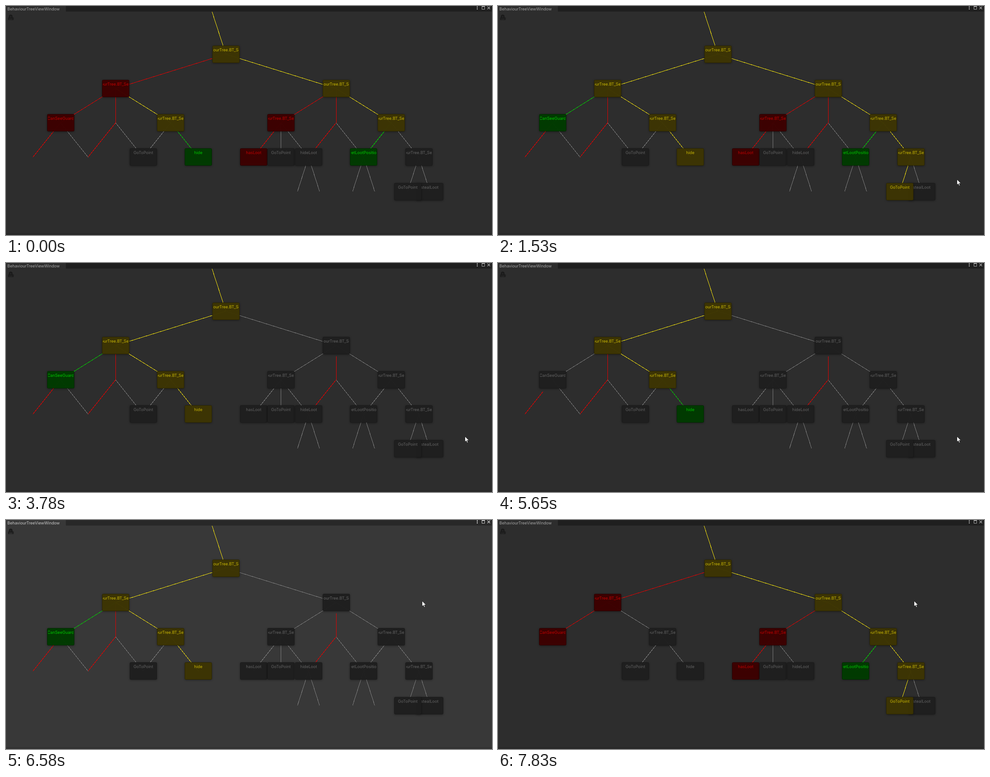
Write an HTML page that moves like this. It is 1088 px wide and 515 px high and loops after 8 s.

```html
<!DOCTYPE html>
<html lang="en">
<head>
<meta charset="utf-8">
<title>Behaviour tree view</title>
<style>
  html, body { margin: 0; width: 100%; height: 100%; overflow: hidden; background: #2d2d2d; }
  svg { display: block; width: 1088px; height: 515px; --bg: #2d2d2d; --bar: #1f1f1f; --ui: #a4a4a4; }
  svg.bright { --bg: #383838; --bar: #282828; --ui: #c8c8c8; }
  text { font: 9.1px Inter, "Liberation Sans", sans-serif; }
  line { stroke-width: 1; shape-rendering: crispEdges; }
  .node rect { stroke-width: 1; fill-opacity: .96; }
  .node { filter: drop-shadow(0 1px 2px rgba(0, 0, 0, .4)); }
  .node text { text-anchor: middle; }
  .node.x rect { fill: #202020; stroke: #1a1a1a; }
  .node.y rect { fill: #3e3604; stroke: #2d2700; }
  .node.r rect { fill: #3e0000; stroke: #2b0000; }
  .node.g rect { fill: #003c00; stroke: #002b00; }
  .node.x text { fill: #636363; }
  .node.y text { fill: #c8b606; }
  .node.r text { fill: #c00000; }
  .node.g text { fill: #00c600; }
  line.x { stroke: #7e7e7e; }
  line.y { stroke: #f7e40c; }
  line.r { stroke: #e60000; }
  line.g { stroke: #00d800; }
</style>
</head>
<body>
<svg id="stage" viewBox="0 0 1088 515">
  <rect width="1088" height="515" fill="var(--bg)"/>
  <rect y="511" width="1088" height="4" fill="#000" opacity=".12"/>
  <rect width="1088" height="12.5" fill="var(--bar)"/>
  <rect width="134" height="13" fill="var(--bg)"/>
  <text x="3" y="9.5" fill="var(--ui)">BehaviourTreeViewWindow</text>
  <g fill="var(--ui)">
    <rect x="1054" y="0" width="2" height="2"/>
    <rect x="1054" y="3" width="2" height="2"/>
    <rect x="1054" y="6" width="2" height="2"/>
  </g>
  <g fill="none" stroke="var(--ui)">
    <path d="M1065.5 1v6.5h6V1"/>
    <path d="M1065 1h7" stroke-width="2"/>
    <path d="M1077.8 1.2l6 6m0-6l-6 6" stroke-width="1.3"/>
  </g>
  <g id="lock">
    <rect x="4.500" y="25" width="13" height="7" rx="2" fill="#000" opacity=".22"/>
    <path d="M7.500 27v-3.500a3 3 0 0 1 6 0V27" fill="#222" stroke="#191919" stroke-width="2"/>
    <path d="M6 31.500V27h9.500v4.500" fill="none" stroke="#1c1c1c" stroke-width="2"/>
  </g>
  <g id="edges"></g>
  <g id="ghosts"></g>
  <g id="nodes"></g>
  <g id="cursor">
    <circle id="click" r="9.500" fill="#ff0" opacity=".47"/>
    <path d="M0 0V12.400L2.900 9.700L4.900 14.300L6.900 13.400L4.900 9H8.900Z" fill="#fff" stroke="#111" stroke-width=".8"/>
  </g>
</svg>
<script>
const NS = 'http://www.w3.org/2000/svg';
const LOOP = 8000, W = 61.7, H = 77.1;
const $ = id => document.getElementById(id);

function add(parent, tag, attrs) {
  const el = document.createElementNS(NS, tag);
  for (const k in attrs) el.setAttribute(k, attrs[k]);
  return parent.appendChild(el);
}

// column and row to the centre of a cell
const at = (col, row) => [122 + W * col, 108.5 + H * row];
const selector = 'BehaviourTree.BT_Selector', sequence = 'BehaviourTree.BT_Sequence';

// key, parent, column, row, label, first state
const tree = [
  ['R', '', 6, 0, selector, 'y'],
  ['A', 'R', 2, 1, sequence, 'r'],
  ['B', 'R', 10, 1, selector, 'y'],
  ['C', 'A', 0, 2, 'CanSeeGuard', 'r'],
  ['D', 'A', 4, 2, sequence, 'y'],
  ['E', 'B', 8, 2, sequence, 'r'],
  ['F', 'B', 12, 2, sequence, 'y'],
  ['G', 'D', 3, 3, 'GoToPoint', 'x'],
  ['H', 'D', 5, 3, 'hide', 'g'],
  ['I', 'E', 7, 3, 'hasLoot', 'r'],
  ['J', 'E', 8, 3, 'GoToPoint', 'x'],
  ['K', 'E', 9, 3, 'hideLoot', 'x'],
  ['L', 'F', 11, 3, 'GetLootPosition', 'g'],
  ['M', 'F', 13, 3, sequence, 'x'],
  ['O', 'M', 13.4, 4, 'stealLoot', 'x'],
  ['N', 'M', 12.6, 4, 'GoToPoint', 'x']
];

// stale edges left over from an earlier layout
const stale = [
  [2, 1, 2, 2, 'r'], [2, 2, 1, 3, 'r'], [2, 2, 3, 3, 'x'],
  [0, 2, -1, 3, 'r', 'C', .34], [0, 2, 1, 3, 'x'],
  [10, 1, 10, 2, 'r', 'B', .31], [10, 2, 9, 3, 'r'], [10, 2, 11, 3, 'x'],
  [9, 3, 8.6, 4, 'x'], [9, 3, 9.4, 4, 'x'],
  [11, 3, 10.6, 4, 'x'], [11, 3, 11.4, 4, 'x']
];

// upper case: node, lower case: the edge leading to it
const steps = [
  [210, 'Mm:y'], [290, 'N:y'], [370, 'n:y'],
  [1530, 'AaHh:y Cc:g'],
  [3400, 'BbCcEeFfIiLlMmNn:x Hh:g'],
  [3480, 'C:g'], [3550, 'c:g'], [3630, 'H:y'], [3780, 'h:y'],
  [5650, 'Cc:x Hh:g'],
  [5730, 'C:g'], [5880, 'c:g'], [5960, 'H:y'], [6030, 'h:y'],
  [7050, 'RAaDdHhc:x C:r'],
  [7220, 'RBbFf:y AacEeIi:r Ll:g'],
  [7300, 'MmN:y'], [7370, 'n:y']
];

const parts = {}, first = {}, centre = {};

function line(group, [x1, y1], [x2, y2], state) {
  return add(group, 'line', { x1, y1, x2, y2, class: state });
}

for (const [key, parent, col, row, label, state] of tree) {
  const c = centre[key] = at(col, row);
  const low = key.toLowerCase();
  const x = Math.round(c[0] - 30.4) + .5, y = Math.round(c[1] - 19.3) + .5;
  parts[low] = line($('edges'), parent ? centre[parent] : [461.3, 13], c, state);

  const g = parts[key] = add($('nodes'), 'g', {});
  add(g, 'rect', { x, y, width: 60, height: 38, rx: 2 });
  const clip = add(g, 'clipPath', { id: 'clip' + key });
  add(clip, 'rect', { x: x + 1.5, y, width: 57, height: 38 });
  const box = add(g, 'g', { 'clip-path': `url(#clip${key})` });
  add(box, 'text', { x: x + 30, y: y + 12.7 }).textContent = label;
  first[key] = first[low] = state;
}

const shaded = [];
for (const [c1, r1, c2, r2, state, owner, cut] of stale) {
  const a = at(c1, r1), b = at(c2, r2);
  const el = line($('ghosts'), a, b, state);
  if (owner) shaded.push({ el, a, b, owner, cut });
}

function statesAt(t) {
  const now = { ...first };
  for (const [time, change] of steps) {
    if (t < time) break;
    for (const item of change.split(' ')) {
      const [keys, state] = item.split(':');
      for (const k of keys) now[k] = state;
    }
  }
  return now;
}

function cursorAt(t) {
  if (t >= 6580) return [931.5, 182];
  const p = Math.min(7, Math.floor((t - 210) / 77)) / 7;
  const left = (1 - p) ** 2;
  return [1027.5 + 56 * left, 390 + 118 * left];
}

const show = (el, on) => el.setAttribute('visibility', on ? 'visible' : 'hidden');

function draw(t) {
  const now = statesAt(t);
  for (const k in parts) {
    const isNode = k < 'a';
    parts[k].setAttribute('class', isNode ? 'node ' + now[k] : now[k]);
  }
  for (const { el, a, b, owner, cut } of shaded) {
    const f = now[owner] === 'x' ? cut : 0;
    el.setAttribute('x1', a[0] + (b[0] - a[0]) * f);
    el.setAttribute('y1', a[1] + (b[1] - a[1]) * f);
  }
  show($('ghosts'), t < 7050);
  $('stage').classList.toggle('bright', t >= 6580 && t < 7050);
  show($('cursor'), t >= 210);
  show($('click'), t >= 7680 && t < 7830);
  $('cursor').setAttribute('transform', `translate(${cursorAt(t)})`);
}

const start = performance.now();
function tick() {
  draw((performance.now() - start) % LOOP);
  requestAnimationFrame(tick);
}
tick();
</script>
</body>
</html>
```
